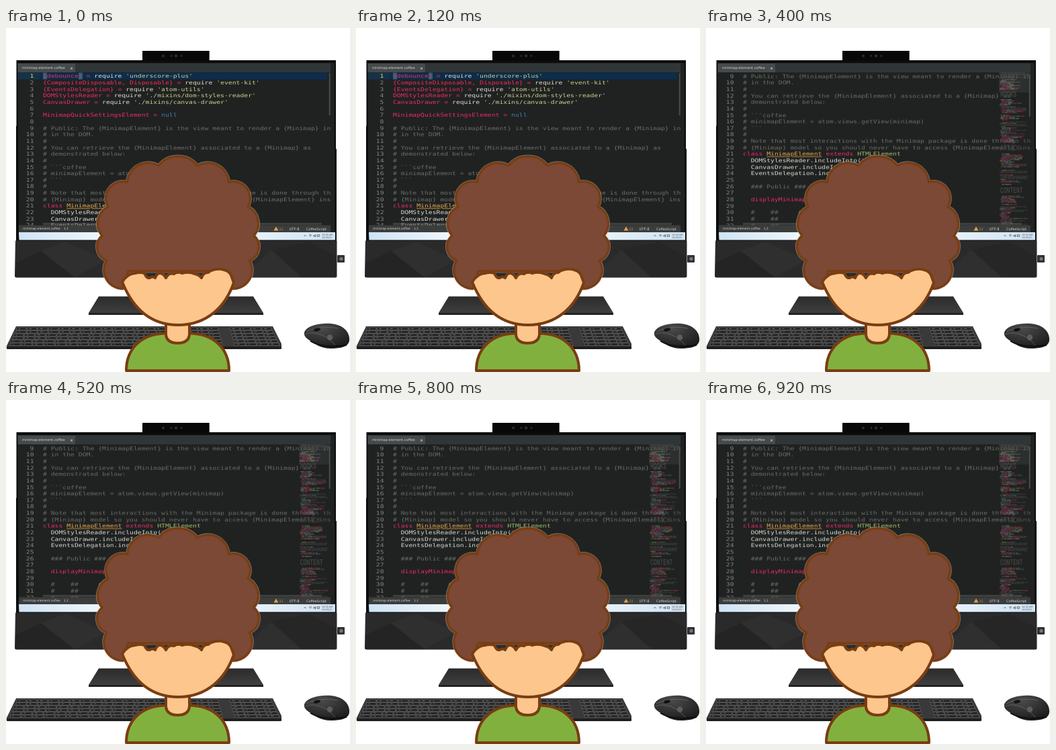
An HTML page that plays this animation: 512 px wide and 512 px high, repeating every 1 s.

```html
<!DOCTYPE html>
<html lang="en">
<head>
<meta charset="utf-8">
<title>Coding at the desk</title>
<style>
  html, body { margin: 0; width: 100%; height: 100%; overflow: hidden; background: #fff; }
  svg { display: block; width: 100vw; height: 100vh; }
  text { white-space: pre; text-rendering: geometricPrecision; }
  .code text { font: 7.8px "DejaVu Sans Mono", monospace; }
  .ui text { font-family: "DejaVu Sans", sans-serif; fill: #d2d2d2; }
  .map text { font: 8px "Liberation Mono", monospace; fill: #50524f; }
  .line { fill: none; stroke: #793d12; stroke-width: 4; stroke-linejoin: round; stroke-linecap: round; }
  .skin { fill: #fdc68d; }
  #hair { fill: #7b4935; stroke-width: 3.4; }

  .scroll { animation: scroll 1s step-end infinite; }
  .map { animation: show 1s step-end infinite; }
  .mapScroll { animation: drift 1s step-end infinite; }
  .thumb { animation: thumb 1s step-end infinite; }

  /* one row is 9.65px */
  @keyframes scroll {
    0% { transform: translateY(0); }
    20% { transform: translateY(-57.9px); }
    40% { transform: translateY(-77.2px); }
    60% { transform: translateY(-135.1px); }
    80%, 100% { transform: translateY(-77.2px); }
  }
  @keyframes show { 0% { opacity: 0; } 20%, 100% { opacity: 1; } }
  @keyframes drift {
    0%, 20% { transform: translateY(0); }
    40% { transform: translateY(-2.7px); }
    60% { transform: translateY(-7.5px); }
    80%, 100% { transform: translateY(-2.7px); }
  }
  @keyframes thumb {
    0% { transform: translateY(0); }
    20% { transform: translateY(1.5px); }
    40% { transform: translateY(2px); }
    60% { transform: translateY(4px); }
    80%, 100% { transform: translateY(2px); }
  }
</style>
</head>
<body>
<svg viewBox="0 0 512 512" preserveAspectRatio="none">
  <defs>
    <clipPath id="editor"><rect x="18" y="66" width="465" height="227.5"/></clipPath>
    <linearGradient id="bar">
      <stop offset="0" stop-color="#cfe4f4"/><stop offset=".3" stop-color="#f4f9fd"/>
      <stop offset=".75" stop-color="#e6f1fa"/><stop offset="1" stop-color="#cfe2f3"/>
    </linearGradient>
    <linearGradient id="foot" x2="0" y2="1">
      <stop offset="0" stop-color="#2b2b2c"/><stop offset="1" stop-color="#414142"/>
    </linearGradient>
    <radialGradient id="shell" cx=".4" cy=".2" r=".8">
      <stop offset="0" stop-color="#4b4b4c"/><stop offset="1" stop-color="#1c1c1d"/>
    </radialGradient>
  </defs>

  <!-- webcam, bezel, chin -->
  <rect x="203" y="34" width="99.7" height="14" fill="#080808"/>
  <g fill="#2d2d2f">
    <circle cx="234" cy="41.5" r="2"/><circle cx="246" cy="41.5" r="1.5"/>
    <circle cx="253" cy="41.5" r="2.3"/><circle cx="261" cy="41.5" r="1.5"/>
  </g>
  <path d="M15.500 48H491V180H492V317H15V146H15.500Z" fill="#0b0c0c"/>
  <path d="M17 52H489V304H19Z" fill="#1f2221"/>
  <path d="M14 316.500H492.500V369.500Q492.500 371.500 490 371.500H16Q13 371.500 13 369Z" fill="#2a2a2b"/>
  <path d="M14 350L52 332 102 371H14Z" fill="#242425"/>
  <path d="M52 332L88 318 150 345 102 371Z" fill="#2f2f30"/>
  <path d="M350 371L395 330 440 371Z" fill="#2f2f30"/>
  <path d="M395 330L450 318 492 340V371H440Z" fill="#262627"/>
  <rect x="493" y="338" width="11" height="11" rx="1" fill="#303132"/>
  <circle cx="499" cy="343.5" r="2.6" fill="#77787a"/>

  <!-- editor -->
  <g clip-path="url(#editor)">
    <g class="scroll code" id="code">
      <rect x="18" y="66.5" width="460" height="10" fill="#0c2d4b"/>
      <rect x="18" y="66.5" width="32" height="10" fill="#173247"/>
      <rect x="55" y="66.5" width="6" height="10" fill="#2a6073"/>
      <rect x="108" y="66.5" width="6" height="10" fill="#2a6073"/>
    </g>
    <g class="map">
      <rect x="436" y="66" width="46" height="228" fill="#222423" opacity=".25"/>
      <g class="mapScroll" id="map"></g>
      <rect x="436" y="66" width="46" height="30" fill="#fff" opacity=".06"/>
    </g>
    <rect class="thumb" x="480.8" y="67" width="1.8" height="63" fill="#4c504f"/>
    <rect x="55" y="290" width="415" height="3.5" fill="#555856" opacity=".55"/>
  </g>

  <!-- tab, status bar, taskbar -->
  <g class="ui">
    <path d="M17 52.5H483V66H17.5Z" fill="#303637"/>
    <path d="M18 53H103V66H18Z" fill="#464a4b"/>
    <text x="24" y="61" font-size="5.2">minimap-element.coffee</text>
    <text x="95" y="61.5" font-size="6" font-weight="bold">×</text>
    <rect x="19" y="293.5" width="464" height="10.5" fill="#3b3d3d"/>
    <text x="25" y="300.3" font-size="4.56">minimap-element.coffee</text>
    <text x="86" y="300.3" font-size="4.56">1,1</text>
    <path d="M398.5 301.5L402 295.5 405.5 301.5Z" fill="#e0a04a"/>
    <text x="406.5" y="300.8" font-size="4.8" style="fill:#d39a4c">11</text>
    <text x="421.5" y="300.5" font-size="5.2">UTF-8</text>
    <text x="447" y="300.5" font-size="4.9">CoffeeScript</text>
    <path d="M19 304H490V315.5H19.5Z" fill="url(#bar)"/>
    <g fill="none" stroke="#555" stroke-width=".8">
      <path d="M443.5 310L445 308.3 446.5 310M451 308.5Q453 306.5 455 308.5M452 310Q453 309 454 310"/>
      <path d="M457.5 309H459L460.5 307.5V311L459 309.7H457.5ZM463 307.8H466.5V310.3H463Z"/>
    </g>
    <text x="470" y="308.8" font-size="3.4" style="fill:#555">10:30 AM</text>
    <text x="470" y="313" font-size="3.4" style="fill:#555">10/30/21</text>
  </g>

  <!-- stand, keyboard, mouse -->
  <path d="M138 399.500H368L383 424V427H123V424Z" fill="url(#foot)"/>
  <path d="M123 425.5H383" stroke="#1d1d1e" stroke-width="2.5"/>
  <path d="M15 444H397L410 470V475Q410 478 406 478H4Q0 478 1 473Z" fill="#39393a"/>
  <path d="M1 476H410" stroke="#1c1c1d" stroke-width="3.5"/>
  <g id="keys" fill="#202021" stroke="#787879" stroke-width=".5"></g>
  <path d="M444 453C448 443 466 439 484 440C502 442 512 452 511 465C510 474 499 477 483 477C468 477 460 470 452 465C446 461 443 458 444 453Z" fill="url(#shell)"/>
  <path d="M445 456C460 450 477 457 490 472M447 452C462 445 478 444 494 447" fill="none" stroke="#68696a" stroke-width=".8"/>
  <path d="M453 466C466 474 482 476 507 472" fill="none" stroke="#0d0d0d" stroke-width="2"/>
  <ellipse cx="463" cy="449" rx="5" ry="2.2" fill="#111" transform="rotate(-12 463 449)"/>
  <circle cx="482" cy="460.5" r="4.2" fill="#5c5d5f"/>

  <!-- person -->
  <path class="line" style="fill:#82b03f" d="M179 510C179 476 203 454.500 239 454.500H272C308 454.500 332 476 332 510Z"/>
  <path class="line skin" d="M238 432V456Q239 469 255.500 469Q272 469 273 456V432Z"/>
  <path id="hairEdge" fill="none" stroke="#c9c6c3" stroke-opacity=".5" stroke-width="5"/>
  <path id="hair" class="line"/>
  <path id="face" class="line skin"/>
</svg>

<script>
  const NS = 'http://www.w3.org/2000/svg';
  const $ = id => document.getElementById(id);
  function add(parent, tag, attrs, content = '') {
    const node = document.createElementNS(NS, tag);
    for (const key in attrs) node.setAttribute(key, attrs[key]);
    node.textContent = content;
    return parent.appendChild(node);
  }

  const source = `{debounce} = require 'underscore-plus'
{CompositeDisposable, Disposable} = require 'event-kit'
{EventsDelegation} = require 'atom-utils'
DOMStylesReader = require './mixins/dom-styles-reader'
CanvasDrawer = require './mixins/canvas-drawer'

MinimapQuickSettingsElement = null

# Public: The {MinimapElement} is the view meant to render a {Minimap} instance
# in the DOM.
#
# You can retrieve the {MinimapElement} associated to a {Minimap} as
# demonstrated below:
#
# \`\`\`coffee
# minimapElement = atom.views.getView(minimap)
# \`\`\`
#
# Note that most interactions with the Minimap package is done through the
# {Minimap} model so you should never have to access {MinimapElement} instances
class MinimapElement extends HTMLElement
  DOMStylesReader.includeInto(this)
  CanvasDrawer.includeInto(this)
  EventsDelegation.includeInto(this)

  ### Public ###

  displayMinimapOnLeft: false

  #    ##     ##  #######   #######  ##    ##  ######
  #    ##     ## ##     ## ##     ## ##   ##  ##    ##
  #    ##     ## ##     ## ##     ## ##  ##   ##
  #    ######### ##     ## ##     ## #####     ######
  #    ##     ## ##     ## ##     ## ##  ##        ##
  #    ##     ## ##     ## ##     ## ##   ##  ##    ##
  #    ##     ##  #######   #######  ##    ##  ######

`.split('\n');

  const PINK = '#f22a69', PLAIN = '#deded8', COMMENT = '#6c6d68';
  const tokens = /(^.+ =|^ +\w+:|class|extends|this|false)|('.+')|(null)|(MinimapElement)|(HTMLElement)/g;
  const tints = [PINK, '#d0cd91', '#3f80a8', '#eda94d', '#a9bf6a'];

  function paint(text, line) {
    if (/^ *#/.test(line)) { add(text, 'tspan', { fill: COMMENT }, line); return; }
    let at = 0;
    for (const hit of line.matchAll(tokens)) {
      const kind = hit.slice(1).findIndex(Boolean);
      add(text, 'tspan', { fill: PLAIN }, line.slice(at, hit.index));
      const part = add(text, 'tspan', { fill: tints[kind] }, hit[0]);
      if (kind === 3) part.setAttribute('text-decoration', 'underline');
      at = hit.index + hit[0].length;
    }
    add(text, 'tspan', { fill: PLAIN }, line.slice(at));
  }

  // the whole screen picture is wider than tall
  const gutter = add($('code'), 'g', { transform: 'translate(41.5 0) scale(1.25 1)' });
  const body = add($('code'), 'g', { transform: 'translate(55 0) scale(1.25 1)' });
  source.forEach((line, i) => {
    const y = 74.4 + i * 9.65;
    add(gutter, 'text', { y, 'text-anchor': 'end', fill: i ? '#858680' : '#e6d35a' }, i + 1);
    paint(add(body, 'text', { y }), line);
  });

  let seed = 11;
  const rnd = () => (seed = seed * 16807 % 2147483647) / 2147483647;

  // minimap: short coloured runs with a heading before each block
  const heads = [[101, 'HOOKS'], [181, 'ATTACH'], [244, 'CONTENT']];
  const hues = ['#b52a55', '#c23460', '#a52a50', '#8d8d88', '#5f625f', '#7d8a4e', '#38708f'];
  for (let y = 67; y < 304; y += 1.75) {
    const nearHead = heads.some(([c]) => Math.abs(y - c) < 7.5);
    if (nearHead || rnd() < .15) continue;
    const note = y < 76 || rnd() < .15;
    let x = 437 + Math.floor(rnd() * 3) * 1.6;
    const end = x + (note ? 36 : 5 + rnd() * 28);
    while (x < end && x < 480) {
      const width = 2 + rnd() * 6;
      const fill = note ? '#4a4d4b' : hues[Math.floor(rnd() * hues.length)];
      add($('map'), 'rect', { x, y, width: Math.min(width, 481 - x), height: 1, fill, opacity: .8 });
      x += width + .8;
    }
  }
  for (const [y, word] of heads)
    add($('map'), 'text', { transform: `translate(438 ${y + 4.2}) scale(1 1.5)` }, word);

  // keyboard rows widen towards the front
  for (let row = 0; row < 6; row++) {
    const y = 446 + row * 4.6, left = 15 - row * 2.3, right = 396 + row * 2.2;
    const step = (right - left) / 24;
    for (let k = 0; k < 24; k++) {
      if (k === 15 || k === 19) continue;
      const x = left + k * step + (row % 2 && k < 15 ? 2 : 0);
      add($('keys'), 'path', { d: `M${x + 1} ${y}h${step - 2.2}l.7 3.5h${1 - step}Z` });
      add($('keys'), 'path', { d: `M${x + 4} ${y + 1.5}h${2 + k % 3}`, stroke: '#aaa' });
    }
  }

  // left curls as [x, y, radius]; the right side is mirrored
  const curls = [[149.5, 346, 28], [143, 309, 22], [152, 266, 28], [180.5, 229.5, 25], [227, 205, 31]];
  const AXIS = 256, START = [174, 388];
  const arc = (x, y, r) => `A${r} ${r} 0 0 1 ${x} ${y}`;
  let hair = 'M' + START;
  for (const c of curls) hair += arc(...c);
  hair += arc(285, 205, 37);
  for (let i = curls.length - 1; i >= 0; i--) {
    const [x, y] = i ? curls[i - 1] : START;
    hair += arc(2 * AXIS - x, y, curls[i][2]);
  }
  hair += 'L330 362H182Z';
  $('hair').setAttribute('d', hair);
  $('hairEdge').setAttribute('d', hair);

  $('face').setAttribute('d', 'M173 378Q180 366 192 365Q200 363 206 365Q209 373 214 372Q218 369 222 372' +
    'Q225 364 230 365Q235 366 238 372Q242 364 250 366Q256 362 262 365Q272 362 281 366Q287 367 291 372' +
    'Q294 363 301 364Q308 358 321 359Q332 361 335 368L339 379C327 414 300 442 256 442C212 442 187 413 173 378Z');
</script>
</body>
</html>
```
